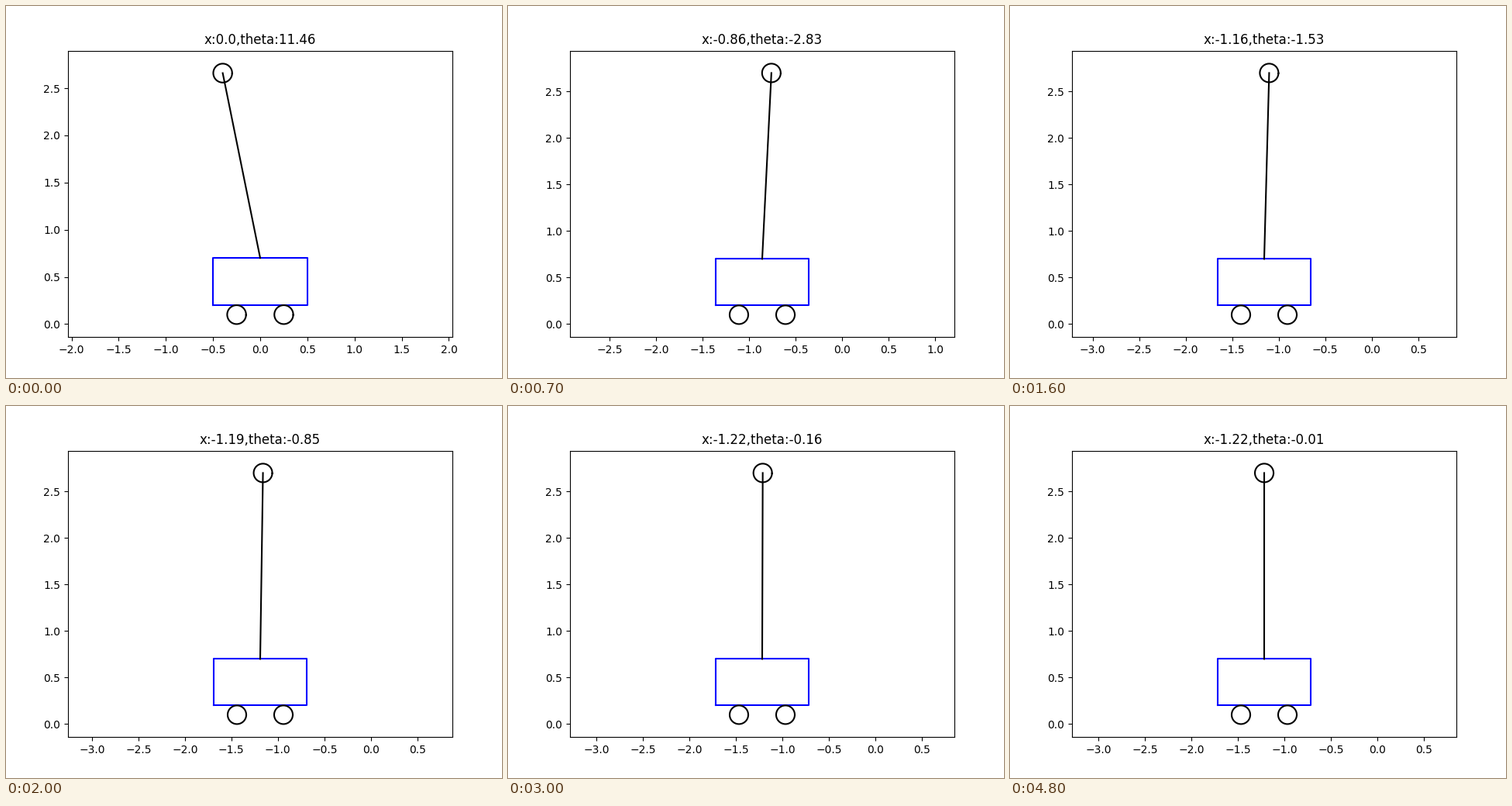
A matplotlib script for the animation above (5000 ms loop, 640 px wide and 480 px high).

```python
"""Inverted pendulum on a cart, balanced by receding-horizon control."""
import math

import matplotlib.pyplot as plt
import numpy as np
from matplotlib.animation import FuncAnimation

BAR = 2.0            # bar length [m]
CART_MASS = 1.0      # [kg]
BALL_MASS = 0.3      # [kg]
G = 9.8              # [m/s^2]
DT = 0.1             # time step [s]
STEPS = 50
HORIZON = 30         # control look-ahead in steps

CART_W, CART_H, RADIUS = 1.0, 0.5, 0.1

# State: position, velocity, angle, angular velocity
A = np.eye(4) + DT * np.array([
    [0, 1, 0, 0],
    [0, 0, BALL_MASS * G / CART_MASS, 0],
    [0, 0, 0, 1],
    [0, 0, G * (CART_MASS + BALL_MASS) / (BAR * CART_MASS), 0],
])
B = DT * np.array([[0], [1 / CART_MASS], [0], [1 / (BAR * CART_MASS)]])
Q = np.diag([0.0, 1.0, 1.0, 0.0])
R = 0.01


def horizon_gain():
    """First feedback gain of the finite-horizon quadratic problem."""
    P = Q
    for _ in range(HORIZON):
        K = (B.T @ P @ A) / (R + (B.T @ P @ B).item())
        P = Q + A.T @ P @ (A - B @ K)
    return K


def simulate():
    closed_loop = A - B @ horizon_gain()
    state = np.array([0.0, 0.0, 0.2, 0.0])
    poses = []
    for _ in range(STEPS):
        state = closed_loop @ state
        poses.append((float(state[0]), float(state[2])))
    return poses


POSES = simulate()
ANGLES = np.arange(0.0, 2 * math.pi, math.radians(3.0))

fig = plt.figure(figsize=(6.4, 4.8), dpi=100)


def circle(ax, x, y):
    ax.plot(x + RADIUS * np.cos(ANGLES), y + RADIUS * np.sin(ANGLES), "-k")


def draw(i):
    x, theta = POSES[i]
    fig.clf()
    ax = fig.add_subplot()

    left, right = x - CART_W / 2, x + CART_W / 2
    bottom, top = 2 * RADIUS, 2 * RADIUS + CART_H
    tip_x = x - BAR * math.sin(theta)
    tip_y = top + BAR * math.cos(theta)

    ax.plot([left, right, right, left, left],
            [bottom, bottom, top, top, bottom], "-b")
    ax.plot([x, tip_x], [top, tip_y], "-k")
    circle(ax, x + CART_W / 4, RADIUS)
    circle(ax, x - CART_W / 4, RADIUS)
    circle(ax, tip_x, tip_y)

    ax.set_title(f"x:{round(x, 2)},theta:{round(math.degrees(theta), 2)}")
    ax.axis("equal")
    return []


anim = FuncAnimation(fig, draw, frames=STEPS, init_func=lambda: draw(0),
                     interval=100, repeat=True, repeat_delay=0, blit=False)
plt.show()
```
